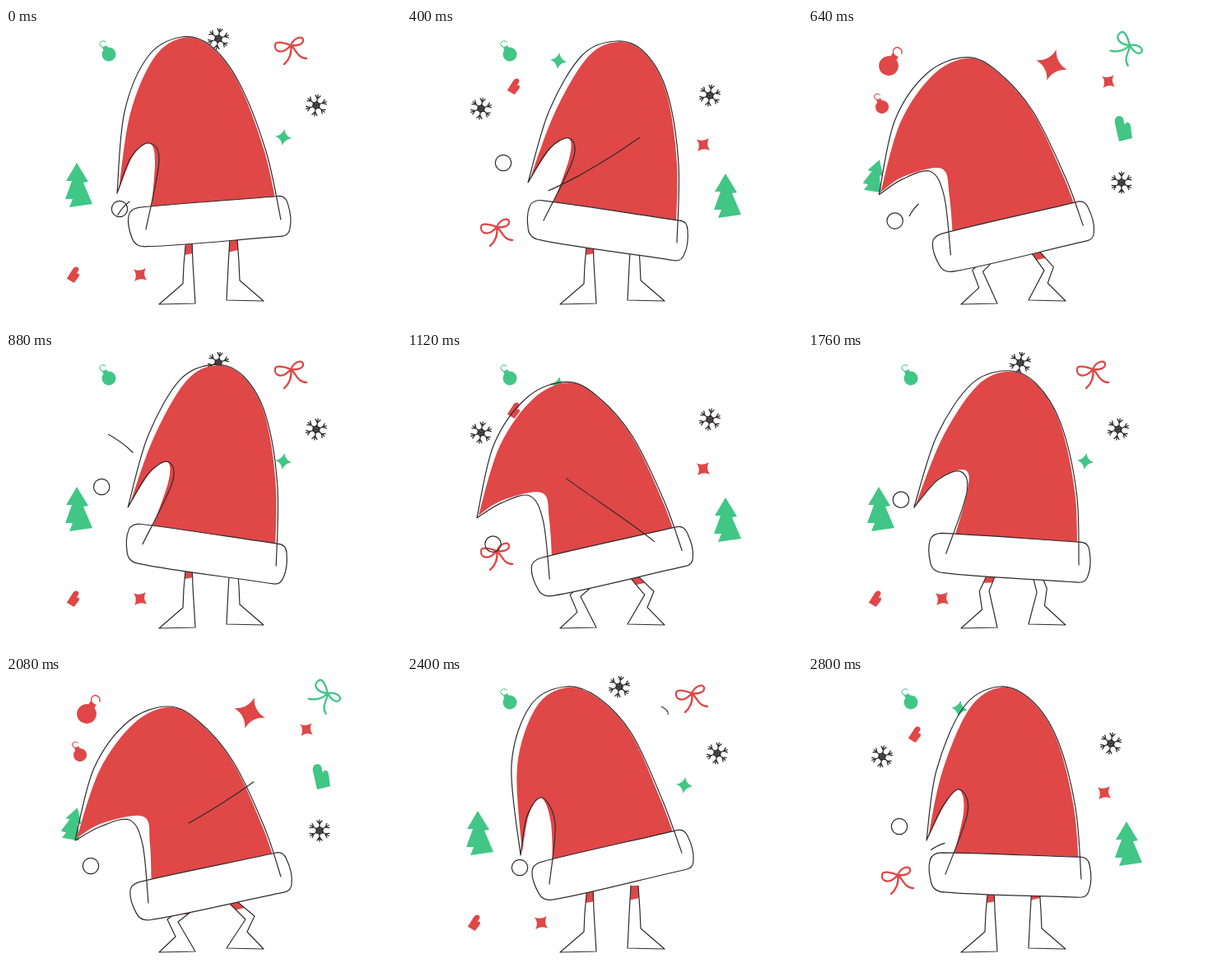
Recreate the animation shown at these times as an HTML page. Size 480 by 360 pixels, loop 2.88 s.

```html
<!DOCTYPE html>
<html lang="en">
<head>
<meta charset="utf-8">
<title>Dancing hat</title>
<style>
html, body { margin: 0; height: 100%; overflow: hidden; background: #fff; }
svg { display: block; width: 100vw; height: 100vh; }
.line { fill: none; stroke: #2f2b2c; stroke-width: 1.2; stroke-linecap: round; stroke-linejoin: round; }
.red { fill: #e04747; color: #e04747; }
.green { fill: #41c685; color: #41c685; }
.dark { color: #2f2b2c; }
.pen { fill: none; stroke: currentColor; stroke-linecap: round; stroke-linejoin: round; }
</style>
</head>
<body>
<svg viewBox="0 0 480 360">
  <defs>
    <path id="tree" d="M-2-27L12-4 6-3 17 23-11 27-7 17-16 17-8-5-15-5Z"/>
    <path id="star" d="M0-10Q2-2 10 0 2 2 0 10-2 2-10 0-2-2 0-10Z"/>
    <path id="mitten" d="M-5 16L-10-6C-12-15-3-18 0-12L2-4C3-9 8-8 9-3L11 12Z"/>
    <g id="bulb"><circle r="8.5"/><path d="M-3-11H3V-6H-3Z"/><path class="pen" d="M0-10C-5-12-5-18 0-18Q3-18 4-15"/></g>
    <path id="bow" class="pen" stroke-width="2.3" d="M0 0C-8-3-19-6-19 0-20 8-10 12 0 0 4-9 13-12 15-7 16-1 8 1 0 0 2 9-2 18-8 23M0 0C6 4 8 16 19 16"/>
    <path id="arm" class="pen" stroke-width="1.3" d="M0 0V-13M-3-12L0-8 3-12M-2-3L0-5 2-3"/>
    <g id="flake"></g>
  </defs>
  <g id="decor"></g>
  <g id="legs"></g>
  <path id="felt" class="red"/>
  <path id="brim" class="line" style="fill:#fff" d="M-84-25C-40-26 40-24 84-24Q95-25 97-14 101 4 97 16 95 25 86 25C40 24-40 26-78 23Q-92 23-95 12-100-5-97-16-95-24-84-25Z"/>
  <path id="outline" class="line"/>
  <circle id="pompom" class="line" r="9.7"/>
  <g id="swooshes"></g>
</svg>
<script>
const LOOP = 2880, DANCE = 472, SCENE = 770;
const $ = id => document.getElementById(id);

// shape, colour, x, y, rotation, scale
const scenes = [
  [['bulb', 'green', 125, 32, -30, 1], ['flake', 'dark', 258, 13, 10, 1], ['bow', 'red', 346, 21, 0, 1],
   ['flake', 'dark', 377, 94, 10, 1], ['star', 'green', 337, 133, 8, 1], ['tree', 'green', 88, 191, 0, 1],
   ['mitten', 'red', 83, 300, 45, .62], ['star', 'red', 163, 300, 40, 1.05]],
  [['bulb', 'green', 125, 32, -30, 1], ['star', 'green', 184, 40, 8, 1], ['mitten', 'red', 131, 71, 45, .62],
   ['flake', 'dark', 90, 98, 10, 1], ['flake', 'dark', 368, 82, 10, 1], ['star', 'red', 360, 142, 40, 1.05],
   ['tree', 'green', 389, 204, 0, 1], ['bow', 'red', 109, 242, 0, 1]],
  [['bulb', 'red', 98, 46, 32, 1.4], ['bulb', 'red', 90, 96, -25, .95], ['tree', 'green', 82, 180, 18, .75],
   ['star', 'red', 296, 45, 17, 1.95], ['bow', 'green', 391, 21, 55, 1], ['star', 'red', 365, 65, 40, 1],
   ['mitten', 'green', 383, 122, 0, 1], ['flake', 'dark', 381, 188, 0, 1]]
];

// Per pose: brim x, y, tilt; pompom; outline from the right end over the top to the tip; notch
const keyTimes = [0, 40, 192, 400, 440];
const poses = [
  [247, 236, -5, 138, 220, 334, 233, 316, 150, 283, 66, 248, 21, 213, 11, 173, 34, 144, 102, 135, 201, 152, 157, 174, 140, 186, 162, 170, 245],
  [250, 231, -13.5, 137, 233, 334, 215, 310, 150, 273, 70, 232, 26, 192, 13, 150, 36, 127, 108, 138, 218, 146, 170, 164, 148, 180, 180, 173, 253],
  [249, 257, -12.4, 103, 231, 334, 244, 314, 184, 276, 104, 234, 55, 197, 37, 149, 55, 107, 112, 84, 200, 115, 183, 150, 175, 166, 205, 173, 276],
  [243, 246, 8, 117, 164, 328, 261, 330, 165, 316, 78, 289, 30, 255, 16, 213, 33, 173, 100, 147, 188, 173, 147, 197, 134, 202, 159, 166, 234],
  [245, 242, 1.5, 111, 183, 332, 247, 325, 160, 303, 77, 271, 29, 232, 13, 189, 38, 156, 115, 144, 200, 164, 158, 184, 138, 194, 166, 167, 241]
];

// Each leg from hip round the foot to hip: standing, crouching
const legs = [
  [[[219, 255], [216, 288], [215, 311], [186, 336], [230, 335], [227, 285], [226, 255]],
   [[225, 275], [196, 296], [206, 317], [186, 336], [230, 335], [209, 299], [240, 275]]],
  [[[281, 255], [283, 285], [284, 307], [313, 332], [268, 331], [270, 290], [272, 255]],
   [[278, 272], [302, 292], [293, 311], [313, 332], [268, 331], [291, 296], [268, 273]]]
];
const stocking = [.64, .5];

const curl = 'M301 34C312 37 322 44 315 51 306 75 312 121 302 128Q265 155 222 179C205 188 190 196 178 200 160 204 145 210 135 229';
const slash = 'M124 100Q141 109 155 123C210 172 300 220 335 263Q339 278 366 287';
// path, x shift, start, sweep time, tail delay
const swooshes = [
  [curl, 0, -500, 520, 70], [curl, -12, 0, 560, 166], [slash, 0, 757, 560, 166],
  [curl, 0, 1775, 500, 105], [curl, 0, 2300, 600, 40]
];

const clamp = v => Math.min(1, Math.max(0, v));
const ease = v => (v = clamp(v), v * v * (3 - 2 * v));
const mix = (a, b, k) => a.map((v, i) => v + (b[i] - v) * k);
const poly = points => 'M' + points.join('L');

// Smooth curve through points, without the initial move
function curve(p) {
  let d = '';
  for (let i = 0; i < p.length - 1; i++) {
    const a = p[i], b = p[i + 1], before = p[i - 1] || a, after = p[i + 2] || b;
    const c1 = a.map((v, j) => v + (b[j] - before[j]) / 6);
    const c2 = b.map((v, j) => v - (after[j] - a[j]) / 6);
    d += `C${c1} ${c2} ${b}`;
  }
  return d;
}
const hatPath = p => 'M' + p[0] + curve(p.slice(0, 8)) + curve(p.slice(7));

// Cyclic Hermite interpolation between the poses
function poseAt(time) {
  const n = poses.length;
  const keyTime = i => keyTimes[(i + n) % n] + Math.floor(i / n) * DANCE;
  const pose = i => poses[(i + n) % n];
  let i = n - 1;
  while (keyTimes[i] > time) i--;
  const span = keyTime(i + 1) - keyTime(i), s = (time - keyTime(i)) / span;
  const slope = (k, j) => (pose(k + 1)[j] - pose(k - 1)[j]) / (keyTime(k + 1) - keyTime(k - 1)) * span;
  return pose(i).map((a, j) => {
    const b = pose(i + 1)[j];
    return a + (b - a) * ease(s) + slope(i, j) * s * (1 - s) ** 2 - slope(i + 1, j) * s * s * (1 - s);
  });
}

function drawHat(time) {
  const [x, y, tilt, px, py, ...rest] = poseAt(time);
  const points = [];
  for (let i = 0; i < rest.length; i += 2) points.push([rest[i], rest[i + 1]]);
  const crouch = Math.max(0, (y - 246) / 11);

  // The colour sits a little off the outline
  const shift = [[-2, 0], [-2, 0], [-1, 0], [0, 1], [2, 1], [7, 2], [7, 2], [2, -3],
    [2, -1 - 3 * crouch], [-1 + 18 * crouch, -4 * crouch], [-5 + 14 * crouch, 0], [4, 0]];
  $('felt').setAttribute('d', hatPath(points.map((p, i) => [p[0] + shift[i][0], p[1] + shift[i][1]])) + 'Z');
  $('outline').setAttribute('d', hatPath(points));
  $('brim').setAttribute('transform', `translate(${x} ${y}) rotate(${tilt})`);
  $('pompom').setAttribute('transform', `translate(${px} ${py})`);

  $('legs').innerHTML = legs.map(([stand, bent], i) => {
    const p = stand.map((v, j) => mix(v, bent[j], crouch));
    const cuff = [p[0], mix(p[0], p[1], stocking[i]), mix(p[6], p[5], stocking[i]), p[6]];
    return `<path class="red" d="${poly(cuff)}Z"/><path class="line" d="${poly(p)}"/>`;
  }).join('');
}

function drawSwooshes(time) {
  $('swooshes').innerHTML = swooshes.map(([d, dx, start, sweep, delay]) => {
    const head = ease((time - start) / sweep), tail = ease((time - start - delay) / sweep);
    if (head - tail < .004) return '';
    return `<path class="line" style="stroke-linecap:butt" pathLength="1" transform="translate(${dx})" d="${d}" stroke-dasharray="0 ${tail} ${head - tail} 2"/>`;
  }).join('');
}

$('flake').innerHTML = '<circle class="pen" r="2.5"/>' +
  [0, 60, 120, 180, 240, 300].map(a => `<use href="#arm" transform="rotate(${a})"/>`).join('');
$('decor').innerHTML = scenes.map(items => '<g>' + items.map(([shape, colour, x, y, turn, size]) =>
  `<use href="#${shape}" class="${colour}" transform="translate(${x} ${y}) rotate(${turn}) scale(${size})"/>`
).join('') + '</g>').join('');

function frame() {
  const now = performance.now() % LOOP;
  const step = now < 80 ? 40 : 80;
  const time = Math.floor(now / step) * step;
  const scene = Math.floor(time % SCENE / SCENE * 3);
  [...$('decor').children].forEach((g, i) => g.style.display = i === scene ? '' : 'none');
  drawHat(time % DANCE);
  drawSwooshes(time);
  requestAnimationFrame(frame);
}
frame();
</script>
</body>
</html>
```
